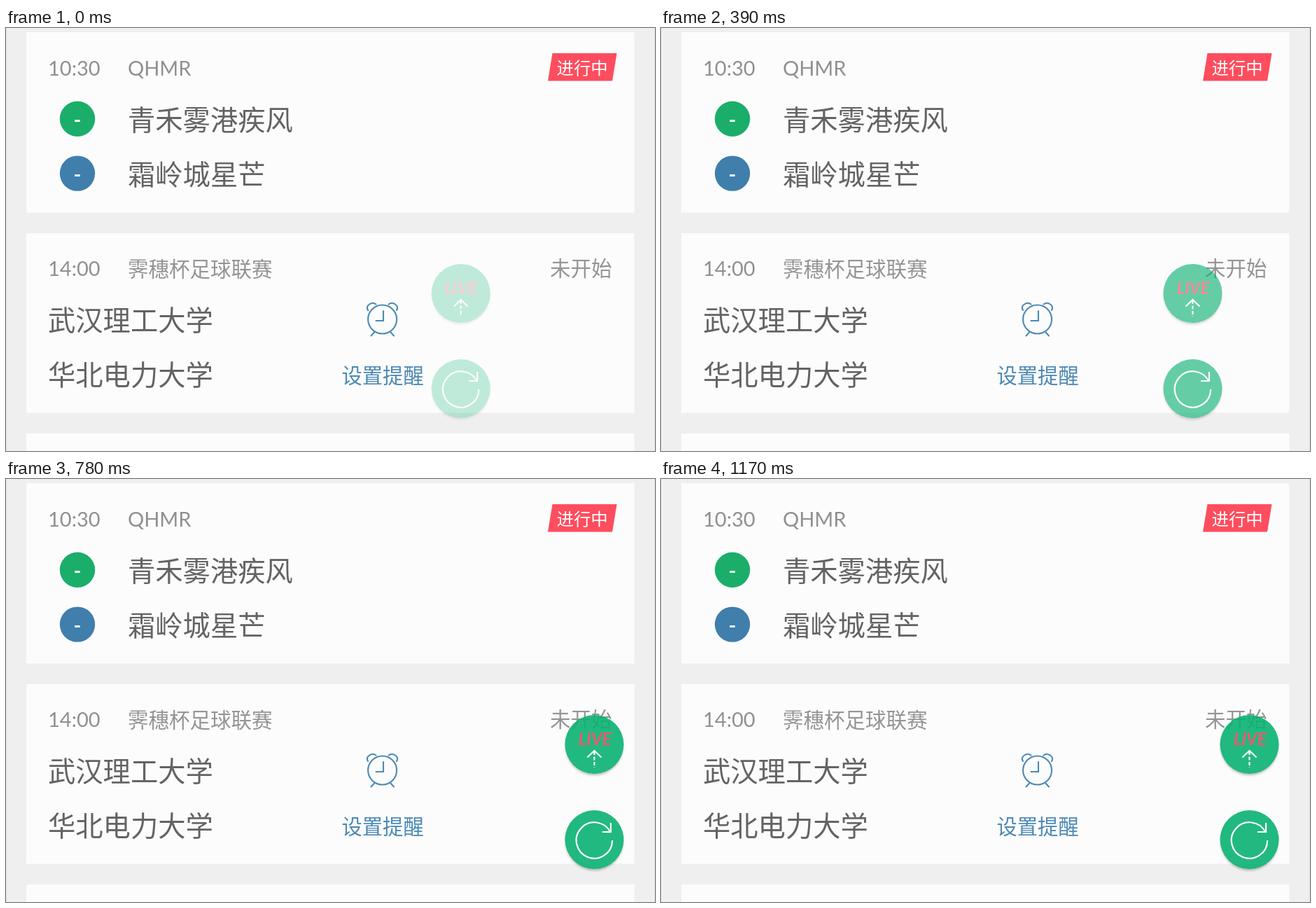
An HTML page for the animation above (1.3 s loop, 927 px wide and 604 px high).

```html
<!DOCTYPE html>
<html lang="zh-CN">
<head>
<meta charset="utf-8">
<title>赛程</title>
<style>
html, body { margin: 0; width: 100%; height: 100%; overflow: hidden; background: #efefef; }
svg { display: block; width: 927px; height: 604px; }
text { font-family: Lato, "Noto Sans CJK SC", "Noto Sans CJK", sans-serif; font-weight: 400; }
.cjk { font-family: "Noto Sans CJK SC", "Noto Sans CJK", sans-serif; font-weight: 350; }
.meta { font-size: 29.5px; fill: #949494; }
.time { font-size: 29px; fill: #909090; }
.team { font-size: 39.3px; fill: #636363; }
.dash { font-size: 29px; font-weight: 700; fill: #fff; text-anchor: middle; }
.live { font-size: 24px; font-weight: 700; font-style: italic; fill: #f8566c; text-anchor: middle; }
.clock { fill: none; stroke: #4c89b4; stroke-width: 2.1; stroke-linecap: round; }
.icon { fill: none; stroke: #fff; stroke-width: 2.2; }
.disc { fill: #09b273; fill-opacity: .9; }
</style>
</head>
<body>
<svg viewBox="0 0 927 604">
  <defs>
    <filter id="soft" x="-20%" y="-20%" width="140%" height="140%">
      <feGaussianBlur stdDeviation="1.8"/>
    </filter>
    <!-- keeps the shadow outside the translucent disc -->
    <mask id="outside" maskUnits="userSpaceOnUse" x="-55" y="-55" width="110" height="115">
      <rect x="-55" y="-55" width="110" height="115" fill="#fff"/>
      <circle r="41.5" fill="#000"/>
    </mask>
    <g id="button">
      <g mask="url(#outside)">
        <circle cy="2.8" r="41.5" fill="#000" fill-opacity=".22" filter="url(#soft)"/>
      </g>
      <circle class="disc" r="42"/>
    </g>
  </defs>

  <rect width="927" height="604" fill="#efefef"/>
  <path d="M.5 0V604M926.5 0V604" stroke="#e0e0e0"/>
  <path d="M29 6H897.5V263.5H29ZM29 293H897.5V549.5H29ZM29 579H897.5V604H29Z" fill="#fcfcfc"/>

  <text class="time" x="60" y="67.5">10:30</text>
  <text class="time" x="174" y="67.5">QHMR</text>
  <path d="M780.5 36H872.5L866 75.5H774Z" fill="#fe4d5e"/>
  <text class="cjk" x="786.5" y="66" font-size="24.4" fill="#fff">进行中</text>
  <circle cx="102" cy="129.7" r="25.2" fill="#1aae6a"/>
  <circle cx="102" cy="207.6" r="25.2" fill="#407eac"/>
  <text class="dash" x="102" y="141">-</text>
  <text class="dash" x="102" y="219">-</text>
  <text class="cjk team" x="174" y="145.5">青禾雾港疾风</text>
  <text class="cjk team" x="174" y="223.5">霜岭城星芒</text>

  <text class="time" x="60" y="354">14:00</text>
  <text class="cjk meta" x="174" y="354.7">霁穗杯足球联赛</text>
  <text class="cjk meta" x="777" y="353.5">未开始</text>
  <text class="cjk team" x="60" y="431.5">武汉理工大学</text>
  <text class="cjk team" x="60" y="509.5">华北电力大学</text>

  <g class="clock">
    <circle cx="537.6" cy="416" r="20.5"/>
    <path d="M539 404V418H528.5M526 434.5L521.5 439.5M549.5 434.5L554 439.5"/>
    <path d="M517 403Q514 398 519 394.5Q524 391 528.5 394.5M558 403Q561 398 556 394.5Q551 391 546.5 394.5"/>
  </g>
  <text class="cjk" x="479.5" y="506.7" font-size="29.3" fill="#4c89b4">设置提醒</text>

  <g id="buttons">
    <g transform="translate(0 379)">
      <use href="#button"/>
      <text class="live" x=".6" y="1">LIVE</text>
      <path class="icon" d="M-10 18.5L0 9L10 18.5"/>
      <path class="icon" d="M0 10V33" stroke-dasharray="5 2.5"/>
    </g>
    <g transform="translate(0 515)">
      <use href="#button"/>
      <path class="icon" d="M25.7 1A25.7 25.7 0 1 1 23 -10.5M23.5 -24V-11H11.5"/>
    </g>
  </g>
</svg>
<script>
const buttons = document.getElementById("buttons");
const LOOP = 1300, STEP = 130;
const END_X = 840.5, TRAVEL = 265;

function draw(ms) {
  const step = Math.floor((ms % LOOP) / STEP);
  // the first step is a short one, the rest are even
  const t = step ? Math.min(1, 0.389 + 0.119 * (step - 1)) : 0.355;
  const p = (1 - Math.cos(Math.PI * t)) / 2;
  buttons.setAttribute("transform", `translate(${END_X - TRAVEL * (1 - p)} 0)`);
  buttons.setAttribute("opacity", p);
}

let start;
function tick(now) {
  start ??= now;
  draw(now - start);
  requestAnimationFrame(tick);
}
draw(0);
requestAnimationFrame(tick);
</script>
</body>
</html>
```
